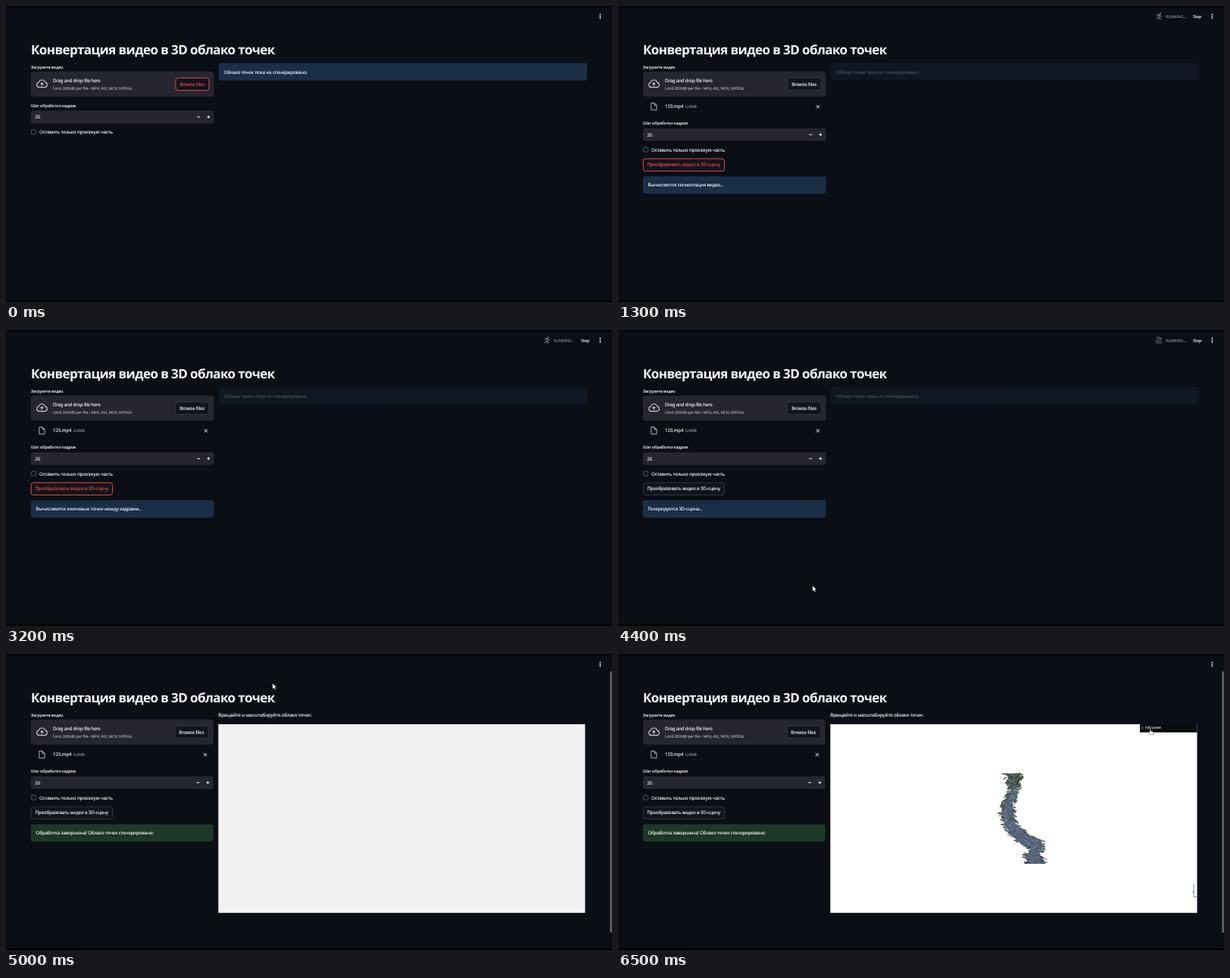
Animation of 800x392 px, one loop 6600 ms. Source, as an HTML page:

```html
<!DOCTYPE html>
<html lang="ru">
<head>
<meta charset="utf-8">
<title>3D</title>
<style>
  html, body { margin: 0; width: 100%; height: 100%; overflow: hidden; background: #0b0f15; }
  svg { display: block; width: 100vw; height: 100vh; }
  text {
    font-family: "Noto Sans", "Open Sans", sans-serif;
    letter-spacing: -.025em;
    text-rendering: geometricPrecision;
    white-space: pre;
  }
</style>
</head>
<body>
<svg id="stage" viewBox="0 0 800 392" preserveAspectRatio="none"></svg>
<script>
const LOOP = 6600, STEP = 100;
const stage = document.getElementById('stage');
const INK = '#f4f5f7', DIM = '#8f9199', RED = '#ee4248', FIELD = '#25262f';
const BLUE = '#1a2e47', GREEN = '#1b3926';

// Moments at which the page changes state
const AT = { file: 100, uploaded: 300, click: 900, points: 2200, scene: 3900, blur: 4000,
             done: 4800, result: 5000, cloud: 5400 };

// Pointer runs: lists of [time, x, y]; the pointer is hidden between runs
const RUNS = [
  [[300, 334, 291], [500, 315.6, 239.8], [600, 290, 240], [800, 112, 239], [900, 108, 239], [1200, 24, 336]],
  [[3900, 243, 318], [4100, 256.8, 338.6], [4999, 256.8, 338.6]],
  [[5000, 351.8, 38.8], [5300, 480, 150], [5600, 560, 215], [6000, 560, 215], [6300, 702, 99.5], [6600, 702, 99.5]]
];

const text = (x, y, s, size = 6.2, fill = INK, extra = `stroke="${fill}" stroke-width=".12"`) =>
  `<text x="${x}" y="${y}" font-size="${size}" fill="${fill}" ${extra}>${s}</text>`;
const rect = (x, y, w, h, fill, r = 3.3, extra = '') =>
  `<rect x="${x}" y="${y}" width="${w}" height="${h}" rx="${r}" fill="${fill}" ${extra}/>`;
const line = (d, color, width = 1, extra = '') =>
  `<path d="${d}" fill="none" stroke="${color}" stroke-width="${width}" ${extra}/>`;
const group = (content, extra) => `<g ${extra}>${content}</g>`;
const button = (x, y, w, label, active) =>
  rect(x, y, w, 16.4, '#11151d', 3.3, `stroke="${active ? RED : '#3d4048'}" stroke-width="${active ? 1 : .7}"`) +
  text(x + 5.3, y + 10.2, label, 6.2, active ? RED : INK);
const notice = (x, y, w, fill, label) =>
  rect(x, y, w, 23, fill) + text(x + 6.6, y + 14, label);

function mulberry(seed) {
  return () => {
    seed = seed + 0x6D2B79F5 | 0;
    let n = Math.imul(seed ^ seed >>> 15, 1 | seed);
    n = n + Math.imul(n ^ n >>> 7, 61 | n) ^ n;
    return ((n ^ n >>> 14) >>> 0) / 4294967296;
  };
}

// Ribbon of splinters between a left and a right edge: [y, left, right]
function makeCloud() {
  const edges = [[158, 509, 533], [166, 515, 532], [180, 516, 529], [190, 512, 524], [200, 506, 523],
                 [212, 504, 524], [225, 508, 527], [233, 513, 536], [240, 516, 546], [246, 525, 561],
                 [252, 530, 562], [260, 546, 561], [266, 535, 556], [272, 537, 564], [278, 540, 566]];
  const random = mulberry(11);
  const pick = list => list[Math.floor(random() * list.length)];
  const edgeAt = y => {
    const i = Math.max(1, edges.findIndex(e => e[0] >= y));
    const [a, b] = [edges[i - 1], edges[i]], k = (y - a[0]) / (b[0] - a[0]);
    return [a[1] + (b[1] - a[1]) * k, a[2] + (b[2] - a[2]) * k];
  };
  const road = ['#66748c', '#7a869b', '#56637a', '#4a566a', '#6d7c95'];
  const trees = ['#2c4a2a', '#3f6238', '#24331f', '#56754a', '#1d2922', '#3b4a44'];
  const rubble = ['#39434f', '#566579', '#2a3036', '#3d5a36', '#8b7f76', '#4b5a70'];
  const outline = edges.map(e => `${e[1] + 2} ${e[0]}`)
    .concat(edges.map(e => `${e[2] - 2} ${e[0]}`).reverse());
  let out = `<path d="M${outline.join('L')}Z" fill="#566277"/>`;
  for (let i = 0; i < 620; i++) {
    const y = 158 + random() * 119.5, [l, r] = edgeAt(y), u = random();
    const x = l + (r - l) * u;
    const paved = y > 176 && Math.abs(u - (y < 200 ? .6 : .5)) < .24;
    const color = pick(paved ? road : y < 222 ? trees : rubble);
    const length = 2 + random() * 4, tilt = y < 200 ? .75 : -.35;
    const side = u < .5 ? -1 : 1;
    const rise = y < 160 || y > 275 ? 0 : tilt * length * (.3 + random() * .6) * -side;
    out += line(`M${x.toFixed(1)} ${y.toFixed(1)}l${(side * length * .8).toFixed(1)} ${rise.toFixed(1)}`,
      color, (.7 + random() * .7).toFixed(1));
  }
  return out;
}
const cloud = makeCloud();

function pointer(t) {
  const run = RUNS.find(r => t >= r[0][0] && t <= r[r.length - 1][0]);
  if (!run) return '';
  const i = Math.max(1, run.findIndex(p => p[0] >= t));
  const [a, b] = [run[i - 1], run[i]], k = (t - a[0]) / (b[0] - a[0]);
  const x = a[1] + (b[1] - a[1]) * k, y = a[2] + (b[2] - a[2]) * k;
  const overPanel = x > 689 && y > 93 && y < 104;
  const shape = overPanel
    ? 'M0 0q1-1 1.3.4v2.2l2.7.6q1 .3.8 1.4l-.6 2.6h-3.4l-2.2-2.8q-.2-1 1-.5l.4.4z'
    : 'M0 0v7.4l1.7-1.5 1.2 2.6 1.3-.6-1.2-2.5h2.3z';
  return `<path transform="translate(${x} ${y})" d="${shape}" fill="#fff" stroke="#111" stroke-width=".4"/>`;
}

function activity(t) {
  const swimming = t >= AT.click && t % 1400 < 350;
  const figure = swimming
    ? '<circle cx="717" cy="11.3" r="1" fill="#777a82"/>' +
      line('M711 10l3-.7 2.3 3.6M711.5 13l3-1.8', '#777a82', 1) +
      line('M709.7 14.6q1.1-1 2.2 0t2.2 0 2.2 0 2.2 0M709.7 17q1.1-1 2.2 0t2.2 0 2.2 0 2.2 0', '#777a82', .9)
    : '<circle cx="716" cy="9.8" r="1.1" fill="#777a82"/>' +
      line('M711.3 13.2l1.2-2 2.5.3-1.5 3.2 2.3 1.2-.4 2.6M713.4 14.8l-.8 1.7-2.3.3M715 11.6l1.1 1.7 2 .2', '#777a82', 1.1);
  return figure + text(723, 15.8, 'RUNNING...', 5.2, '#83868e') + text(759, 15.8, 'Stop', 5.5);
}

function uploader(t, right) {
  const focused = t < AT.click;
  return text(33, 82.6, 'Загрузите видео', 5.5) +
    rect(33, 87, right - 33, 33, FIELD) +
    line('M43.7 107.6a3.2 3.2 0 0 1-.5-6.3a4.4 4.4 0 0 1 8.5-.2a3.3 3.3 0 0 1-.2 6.5zM47.4 106v-4M45.4 103.6l2-2 2 2',
      '#c9cbd0', 1.1, 'stroke-linejoin="round"') +
    text(62, 101.4, 'Drag and drop file here', 6.2, INK, 'stroke="#f4f5f7" stroke-width=".12" style="letter-spacing:-.035em"') +
    text(62, 111.3, 'Limit 200MB per file • MP4, AVI, MOV, MPEG4', 5.2, '#a6a8af') +
    button(right - 50.6, 95.3, 44, 'Browse files', focused);
}

function fileRow(right) {
  return line('M43.8 128.5h4.2l3 3v6.3h-7.2zM48 128.5v3h3', '#d5d7db', .8, 'stroke-linejoin="round"') +
    text(62, 135.2, '123.mp4') + text(89, 135.2, '6.0MB', 5.2, DIM) +
    line(`M${right - 12.7} 131.3l4.2 4.2m0-4.2l-4.2 4.2`, INK, 1);
}

function settings(right) {
  return text(33, 134.2, 'Шаг обработки кадров', 5.5) +
    rect(33, 138.6, right - 33, 16.8, FIELD) + text(38.4, 149.3, '20') +
    line(`M${right - 22.3} 147h4M${right - 9.2} 147h4m-2-2v4`, INK, 1) +
    rect(33.4, 163.7, 6.2, 6.2, '#0f131a', 1.4, 'stroke="#666973" stroke-width=".7"') +
    text(44, 169.3, 'Оставить только проезжую часть');
}

function progress(t, right) {
  const w = right - 33, label = 'Преобразовать видео в 3D-сцену';
  if (t < AT.uploaded) return '';
  if (t < AT.click)
    return notice(33, 202, w, GREEN, 'Видео 123.mp4 загружено') + button(33.2, 232, 107.3, label, t >= 800);
  const status = t < AT.points ? 'Вычисляется сегментация видео...'
    : t < AT.scene ? 'Вычисляются ключевые точки между кадрами...'
    : t < AT.done ? 'Генерируется 3D-сцена...'
    : 'Обработка завершена! Облако точек сгенерировано:';
  return button(33.2, 202.2, 107.3, label, t < AT.blur) +
    notice(33, 225.4, w, t < AT.done ? BLUE : GREEN, status);
}

function viewer(t) {
  const ready = t >= AT.cloud;
  let out = text(280.3, 83, 'Вращайте и масштабируйте облако точек:') +
    rect(280.3, 93, 484.2, 249.8, ready ? '#fff' : '#f1f1f1', 0);
  if (ready) out += cloud +
    rect(689, 93, 75.5, 10.8, '#0c0c0c', 0) +
    line('M691.5 96.3l1.6 1.5-1.6 1.5', '#ddd', .8) +
    text(696, 99.4, 'K3D panel', 4.5, '#ddd') +
    line('M760 305v16.5', '#6b7688', .9) + line('M760 321.8h4.5', '#d8503e', .9) +
    text(758.8, 316, 'z', 3.6, '#333');
  return out + rect(797.2, 23, 2.8, 346, '#5b5e66', 1.2);
}

function draw(t) {
  const finished = t >= AT.result, right = finished ? 273.6 : 274.5;
  const hasFile = t >= AT.file;
  const running = hasFile && t < AT.uploaded || t >= AT.click && !finished;
  stage.innerHTML =
    rect(0, 0, 800, 392, '#0b0f15', 0) +
    rect(0, 0, 800, 1.3, '#000', 0) + rect(0, 390, 800, 2, '#000', 0) +
    [11.2, 13.6, 16].map(y => `<circle cx="784.4" cy="${y}" r=".9" fill="${INK}"/>`).join('') +
    (running ? activity(t) : '') +
    text(33, 64.2, 'Конвертация видео в 3D облако точек', 17, '#fafafa', 'font-weight="700" style="letter-spacing:-.035em"') +
    uploader(t, right) +
    (hasFile ? fileRow(right) : '') +
    group(settings(right), `transform="translate(0 ${hasFile ? 23.3 : 0})"`) +
    progress(t, right) +
    (finished ? viewer(t)
      : group(notice(281, 75.5, 486, BLUE, 'Облако точек пока не сгенерировано.'),
          `opacity="${t < AT.click ? 1 : .28}"`)) +
    pointer(t);
}

let shown = -1;
const start = performance.now();
function tick() {
  const t = Math.floor((performance.now() - start) % LOOP / STEP) * STEP;
  if (t !== shown) draw(shown = t);
  requestAnimationFrame(tick);
}
tick();
</script>
</body>
</html>
```
